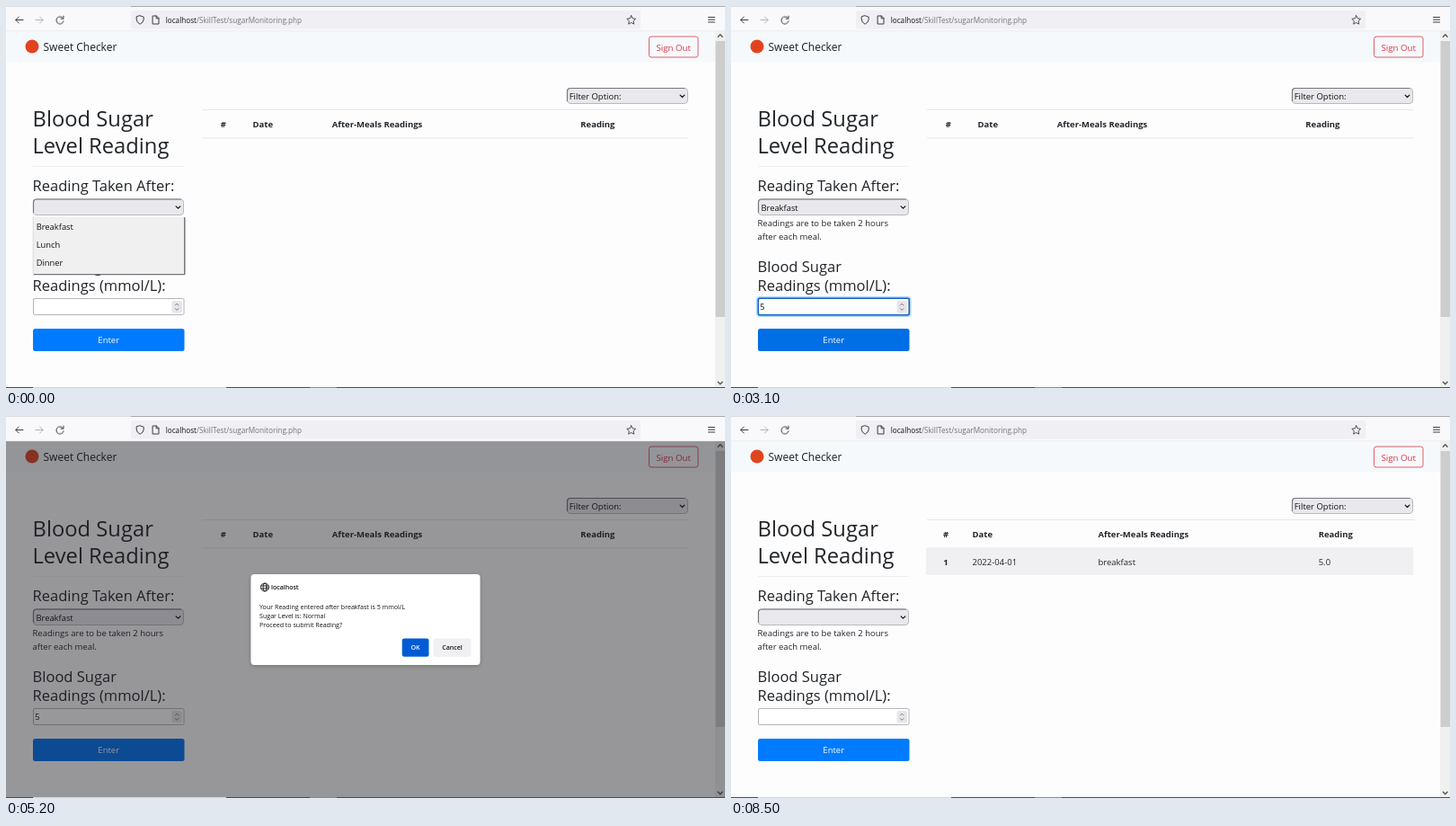
These frames come from a looping animation (800x425 px, 8800 ms). An HTML page:

```html
<!DOCTYPE html>
<html lang="en">
<head>
<meta charset="utf-8">
<title>Blood sugar form</title>
<style>
html, body { margin: 0; width: 100%; height: 100%; overflow: hidden; background: #fdfdfd; }
svg { display: block; width: 800px; height: 425px; }
text { font: 9.5px "Open Sans", "Noto Sans", sans-serif; fill: #212529; white-space: pre; }
.h2 { font-size: 23.75px; }
.h3 { font-size: 16.55px; }
.field { font-size: 9.35px; fill: #111; }
.brand { font-size: 12px; fill: #1c1d1f; }
.url { font-size: 8.2px; fill: #74747b; }
.url tspan { fill: #15141a; }
.small { font-size: 7.1px; fill: #15141a; }
.b { font-weight: 700; }
.semi { font-weight: 600; }
.mid { text-anchor: middle; }
.white { fill: #fff; }
.line { fill: none; stroke: #3c3c42; stroke-width: 1; stroke-linecap: round; stroke-linejoin: round; }
.rule { stroke: #e4e7ea; stroke-width: 1; }

/* Shared 8.8 s timeline */
.t { animation: 8.8s step-end infinite; }
.soft { animation-timing-function: linear; }
#popup { animation-name: popup; }
#hot { animation-name: hot; }
#choice { animation-name: choice; }
#hover { animation-name: hover; }
#focus { animation-name: focus; }
#caret { animation-name: caret; }
#value { animation-name: value; }
#enter { animation-name: enter; }
#ring { animation-name: ring; }
#modal { animation-name: modal; }
#ok { animation-name: ok; }
#status, #spin { animation-name: busy; }
#idle { animation-name: idle; }
#before { animation-name: before; }
#after { animation-name: after; }

@keyframes popup { 0% { opacity: 1 } 11.363% { opacity: .65 } 12.5% { opacity: .3 } 13.636%, 100% { opacity: 0 } }
@keyframes hot { 0% { opacity: 0 } 5.681%, 100% { opacity: 1 } }
@keyframes choice { 0% { opacity: 0 } 11.363% { opacity: 1 } 78.409%, 100% { opacity: 0 } }
@keyframes hover { 0% { opacity: 0 } 17.045% { opacity: 1 } 34.09%, 100% { opacity: 0 } }
@keyframes focus { 0%, 20.454% { opacity: 0 } 22.159%, 37.5% { opacity: 1 } 38.636%, 100% { opacity: 0 } }
@keyframes caret { 0% { opacity: 0 } 21.59% { opacity: 1 } 26.136%, 100% { opacity: 0 } }
@keyframes value { 0% { opacity: 0 } 27.272% { opacity: 1 } 78.409%, 100% { opacity: 0 } }
@keyframes enter {
  0%, 34.09% { fill: #007bff }
  35.795%, 37.5% { fill: #0069d9 }
  38.636%, 41.5% { fill: #0062cc }
  42.045%, 77.272% { fill: #0073f0 }
  78.409%, 100% { fill: #007bff }
}
@keyframes ring {
  0%, 37.5% { opacity: 0 }
  39.204%, 41.5% { opacity: 1 }
  42.045%, 45.4% { opacity: .35 }
  45.454%, 100% { opacity: 0 }
}
@keyframes modal { 0% { opacity: 0 } 42.045% { opacity: 1 } 77.272%, 100% { opacity: 0 } }
@keyframes ok {
  0%, 57.954% { fill: #0061e0 }
  61.363%, 73.863% { fill: #0250bb }
  74.99%, 100% { fill: #053e94 }
}
@keyframes busy { 0% { opacity: 0 } 77.272% { opacity: 1 } 79.545%, 100% { opacity: 0 } }
@keyframes idle { 0% { opacity: 1 } 77.272% { opacity: 0 } 79.545%, 100% { opacity: 1 } }
@keyframes before { 0% { opacity: 1 } 78.409%, 100% { opacity: 0 } }
@keyframes after { 0% { opacity: 0 } 78.409%, 100% { opacity: 1 } }
</style>
</head>
<body>
<svg viewBox="0 0 800 425">
  <defs>
    <path id="chevron" class="line" d="M-2.4-1.2 0 1.2 2.4-1.2" style="stroke:#111;stroke-width:1.2"/>
    <path id="reload" class="line" d="M3.4-2.3A4.1 4.1 0 1 0 4.1 1M4-4.6V-1.7H1.1"/>
    <filter id="shadow" x="-10%" y="-20%" width="120%" height="150%">
      <feDropShadow dx="0" dy="1" stdDeviation="2" flood-opacity=".25"/>
    </filter>
  </defs>

  <rect width="800" height="425" fill="#fdfdfd"/>

  <!-- Page header -->
  <rect y="28" width="789" height="34.5" fill="#f6f9fb"/>
  <circle cx="29" cy="45" r="7.5" fill="#e2431f"/>
  <text class="brand" x="41.5" y="50.2">Sweet Checker</text>
  <rect x="715.5" y="34" width="54.5" height="23" rx="2.5" fill="none" stroke="#dc3545" stroke-width=".8"/>
  <text class="mid" x="742.7" y="49.5" style="fill:#dc3545;font-size:9.7px">Sign Out</text>

  <!-- Form -->
  <text class="h2" x="29.5" y="133.5">Blood Sugar</text>
  <text class="h2" x="29.5" y="163.5">Level Reading</text>
  <path class="rule" d="M30 178.5H198" style="stroke:#f0f0f2"/>
  <text class="h3" x="29.5" y="206">Reading Taken After:</text>
  <rect x="30.5" y="215" width="167" height="17.5" rx="3.5" fill="#e9e9ed" stroke="#b9b9bf"/>
  <path class="line" d="M30.5 229.5V218.5Q30.5 215 34 215H194.5" style="stroke:#77777d;stroke-width:1.2"/>
  <use href="#chevron" x="191.5" y="224"/>
  <text id="choice" class="field t" x="33.5" y="227.7">Breakfast</text>
  <text x="29.5" y="244.5">Readings are to be taken 2 hours</text>
  <text x="29.5" y="259.5">after each meal.</text>
  <text class="h3" x="29.5" y="295.7">Blood Sugar</text>
  <text class="h3" x="29.5" y="316.7">Readings (mmol/L):</text>

  <rect x="30.5" y="325.5" width="167.5" height="18" rx="1.5" fill="#fff" stroke="#b4b4ba"/>
  <rect id="hover" class="t" x="30.5" y="325.5" width="167.5" height="18" rx="1.5" fill="none" stroke="#77777f"/>
  <g id="focus" class="t soft" fill="none">
    <rect x="29" y="324" width="170.5" height="21" rx="3" stroke="#80bdff" stroke-opacity=".6" stroke-width="2"/>
    <rect x="30.3" y="325.3" width="168" height="18.4" rx="1.5" stroke="#1463c4" stroke-width="1.5"/>
  </g>
  <rect x="184.5" y="328" width="11.5" height="13.5" rx="2" fill="#e6e6ea"/>
  <path class="line" d="M188.4 333 190.2 331.2 192 333M188.4 336.6 190.2 338.4 192 336.6" style="stroke:#6b6b72;stroke-width:.9"/>
  <path id="caret" class="line t" d="M33.5 329.5V340"/>
  <text id="value" class="field t" x="32.3" y="338.4">5</text>

  <rect id="enter" class="t soft" x="30" y="359" width="168.5" height="25" rx="2.5" fill="#007bff"/>
  <rect id="ring" class="t soft" x="29" y="358" width="170.5" height="27" rx="3.5" fill="none" stroke="#7fbbff" stroke-width="2"/>
  <text class="mid white" x="114.2" y="375.3">Enter</text>

  <!-- Table -->
  <rect x="624.5" y="91.5" width="134" height="17" rx="3.5" fill="#e9e9ed" stroke="#b9b9bf"/>
  <path class="line" d="M624.5 105.5V95Q624.5 91.5 628 91.5H755" style="stroke:#77777d;stroke-width:1.2"/>
  <text class="field" x="626.7" y="104" style="font-size:9.5px">Filter Option:</text>
  <use href="#chevron" x="752.5" y="100.3"/>
  <path class="rule" d="M218 115.5H759.5M218 147H759.5"/>
  <g id="before" class="t">
    <text class="b mid" x="241.7" y="135">#</text>
    <text class="b" x="274.5" y="135">Date</text>
    <text class="b" x="362.7" y="135">After-Meals Readings</text>
    <text class="b" x="639.3" y="135">Reading</text>
  </g>
  <g id="after" class="t">
    <rect x="217" y="147" width="542" height="30" fill="#f0f0f2"/>
    <text class="b mid" x="239" y="135">#</text>
    <text class="b" x="268.5" y="135">Date</text>
    <text class="b" x="408.5" y="135">After-Meals Readings</text>
    <text class="b" x="653.7" y="135">Reading</text>
    <text class="b mid" x="239" y="166.2">1</text>
    <text x="268.5" y="166.2">2022-04-01</text>
    <text x="408.5" y="166.2">breakfast</text>
    <text x="653.7" y="166.2">5.0</text>
  </g>

  <!-- Option list -->
  <g id="popup" class="t">
    <rect x="30.5" y="235" width="169" height="64.3" rx="1" fill="#77777b"/>
    <rect x="30" y="234.3" width="168" height="63.7" fill="#f1f0f1"/>
    <path d="M30.2 234.3V298" stroke="#c8c8cb" stroke-width=".6"/>
    <text class="field" x="33.7" y="249.3">Breakfast</text>
    <g id="hot" class="t">
      <rect x="31" y="236" width="167" height="19" fill="#0078d7"/>
      <text class="field" x="33.7" y="249.3" style="fill:#fff">Breakfast</text>
    </g>
    <text class="field" x="33.7" y="269.3">Lunch</text>
    <text class="field" x="33.7" y="289.3">Dinner</text>
  </g>

  <!-- Scrollbar -->
  <rect x="789" y="28" width="11" height="397" fill="#f0f0f0"/>
  <rect x="789.5" y="39" width="10.5" height="307" fill="#cdcdcd"/>
  <path class="line" d="M792.3 34.2 794.7 31.8 797.1 34.2M792.3 418.3 794.7 420.7 797.1 418.3" style="stroke:#505050;stroke-width:1.3"/>

  <g id="status" class="t">
    <rect x="-1" y="412" width="166" height="14" rx="1" fill="#f6f6f8" stroke="#d5d5d9" stroke-width=".8"/>
    <text class="small" x="2" y="421.4" style="font-size:7.3px;fill:#3f3f46">localhost</text>
  </g>

  <!-- Confirm dialog -->
  <g id="modal" class="t">
    <rect y="28" width="800" height="397" fill="#1c1b22" fill-opacity=".45"/>
    <rect x="272.5" y="176" width="255" height="101" rx="4" fill="#fff" filter="url(#shadow)"/>
    <g class="line" style="stroke:#15141a;stroke-width:.9">
      <circle cx="288" cy="190.5" r="4.5"/>
      <ellipse cx="288" cy="190.5" rx="2" ry="4.5"/>
      <path d="M284 189H292M284 192H292"/>
    </g>
    <text class="small semi" x="295" y="193" style="font-size:7px">localhost</text>
    <text class="small" x="282" y="215.3">Your Reading entered after breakfast is 5 mmol/L</text>
    <text class="small" x="282" y="225.3">Sugar Level is: Normal</text>
    <text class="small" x="282" y="235.3">Proceed to submit Reading?</text>
    <rect id="ok" class="t soft" x="440.7" y="247.4" width="29.8" height="20.4" rx="2.5" fill="#0061e0"/>
    <text class="small semi mid" x="455.5" y="260.4" style="fill:#fff">OK</text>
    <rect x="475.5" y="247.4" width="42" height="20.4" rx="2.5" fill="#f0f0f3"/>
    <text class="small semi mid" x="496.5" y="260.4">Cancel</text>
  </g>

  <!-- Browser toolbar -->
  <rect width="800" height="28" fill="#f9f9fb"/>
  <path d="M139 .5H800" stroke="#a9a9ae"/>
  <path d="M0 .5H139" stroke="#dcdce0"/>
  <path d="M0 27.7H800" stroke="#e6e6ea" stroke-width=".6"/>
  <rect x="139" y="5" width="567" height="20.5" rx="2.5" fill="#f0f0f4"/>
  <path class="line" d="M19 15.5H11M14.3 12 10.8 15.5 14.3 19"/>
  <path class="line" d="M33 15.5H41M37.7 12 41.2 15.5 37.7 19" style="stroke:#b4b4b8"/>
  <g transform="translate(60 15.7)">
    <g id="idle" class="t"><use href="#reload"/></g>
    <g id="spin" class="t"><use href="#reload" transform="scale(-1 1)"/></g>
  </g>
  <path class="line" d="M149.2 10.8 153.2 12.2V15Q153 18.3 149.2 20.2 145.4 18.3 145.2 15V12.2Z"/>
  <path class="line" d="M163.5 11H167.5L170 13.5V20H163.5ZM167.2 11V13.8H170"/>
  <text class="url" x="177.7" y="18.6"><tspan>localhost</tspan>/SkillTest/sugarMonitoring.php</text>
  <path class="line" d="M695.7 10.7 697.2 13.8 700.6 14.3 698.1 16.7 698.7 20.1 695.7 18.5 692.7 20.1 693.3 16.7 690.8 14.3 694.2 13.8Z" style="stroke-width:.9"/>
  <path class="line" d="M781.5 12.5H788.5M781.5 15.2H788.5M781.5 18H788.5"/>

  <!-- Taskbar edge -->
  <path d="M0 424.5H800" stroke="#4c4c4e"/>
  <path d="M30 424.5H245" stroke="#d6d6d8"/>
  <path d="M338 424.5H368" stroke="#8b8b8d"/>
</svg>
</body>
</html>
```
